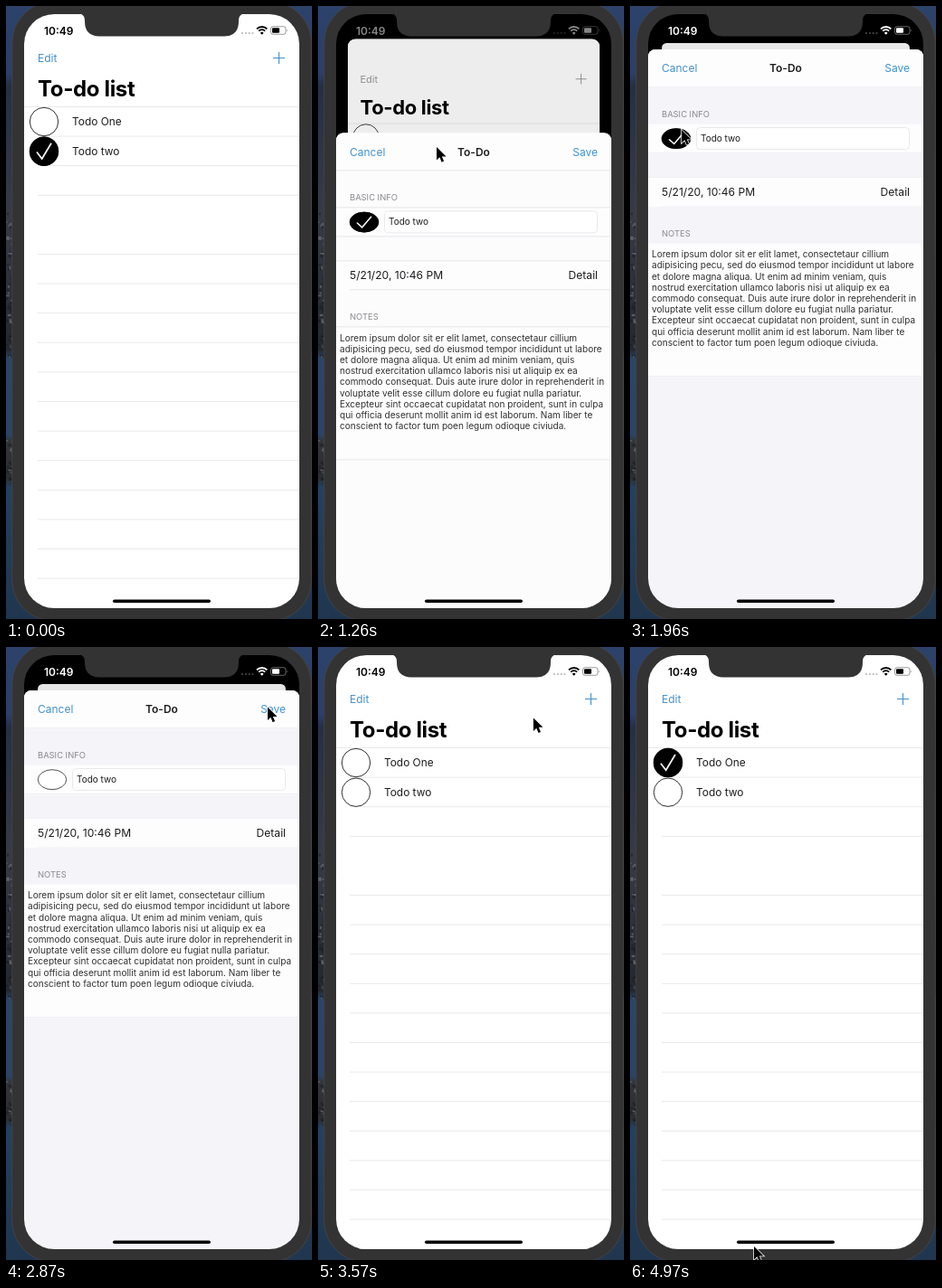
An HTML page for the animation above (5040 ms loop, 338 px wide and 678 px high).

```html
<!DOCTYPE html>
<html lang="en">
<head>
<meta charset="utf-8">
<title>To-do list</title>
<style>
html, body { margin: 0; width: 100%; height: 100%; overflow: hidden; background: #333; }
svg { display: block; width: 338px; height: 678px; font-family: Inter, "Liberation Sans", sans-serif; }
text { white-space: pre; }
</style>
</head>
<body>
<svg id="stage" viewBox="0 0 338 678" xmlns="http://www.w3.org/2000/svg"></svg>
<script>
const LOOP = 5040, BLUE = '#4390cd', INK = '#1c1c1e';
const NOTES = [
  'Lorem ipsum dolor sit er elit lamet, consectetaur cillium',
  'adipisicing pecu, sed do eiusmod tempor incididunt ut labore',
  'et dolore magna aliqua. Ut enim ad minim veniam, quis',
  'nostrud exercitation ullamco laboris nisi ut aliquip ex ea',
  'commodo consequat. Duis aute irure dolor in reprehenderit in',
  'voluptate velit esse cillum dolore eu fugiat nulla pariatur.',
  'Excepteur sint occaecat cupidatat non proident, sunt in culpa',
  'qui officia deserunt mollit anim id est laborum. Nam liber te',
  'conscient to factor tum poen legum odioque civiuda.'
];

// y is the middle of the capitals
const text = (x, y, size, str, attrs = '') =>
  `<text x="${x}" y="${y + size * 0.364}" font-size="${size}" fill="${INK}" ${attrs}>${str}</text>`;
const rect = (x, y, w, h, fill, attrs = '') =>
  `<rect x="${x}" y="${y}" width="${w}" height="${h}" fill="${fill}" ${attrs}/>`;
const rule = (x, y, color, attrs = '') => rect(x, y, 324 - x, 1, color, attrs);
const checkbox = (id, x, y, scaleY = 1) =>
  `<g transform="translate(${x} ${y}) scale(1 ${scaleY})">
    <circle r="15.7" fill="#fff" stroke="#333"/>
    <g id="${id}"><circle r="16.2"/>
      <path d="M-8 .8L-2.3 8.2 8-9" fill="none" stroke="#fff" stroke-width="1.7"/></g>
  </g>`;

const listLines = Array.from({ length: 17 }, (_, i) =>
  rule(i ? 35 : 20, 111 + 32.6 * i, '#e9e9eb', i === 4 ? 'id="midLine"' : '')).join('');

const list = `<g id="list" clip-path="url(#cardClip)">
  ${rect(20, 9, 304, 657, '#fff')}${listLines}
  <g id="tint">${text(35, 57.5, 12, 'Edit', 'style="fill:inherit"')}
    <path d="M295 57.5h13M301.5 51v13" stroke-width="1.1"/></g>
  ${text(35, 91.6, 24, 'To-do list', 'font-weight="700" letter-spacing="-.35" style="fill:#000"')}
  ${checkbox('markOne', 42, 128)}${checkbox('markTwo', 42, 160.7)}
  ${text(73, 128, 11.9, 'Todo One', 'id="labelOne"')}${text(73, 160.5, 11.9, 'Todo two')}
  <rect id="dim" x="20" y="9" width="304" height="657"/>
</g>`;

const sheet = `<g id="sheet">
  ${rect(20, 48, 304, 700, '#f4f4f9', 'rx="8"')}
  ${rect(20, 48, 304, 700, '#fff', 'rx="8" id="veil"')}
  ${rect(20, 48, 304, 41, '#fdfdfe', 'rx="8"')}${rect(20, 60, 304, 29, '#fdfdfe')}
  ${[[130, 32], [190, 32], [262, 147]].map(([y, h]) => rect(20, y, 304, h, '#fdfdfe')).join('')}
  <g id="rules">${[89, 130, 162, 189, 221, 262, 409].map(y => rule(y === 221 ? 35 : 20, y, '#e6e6ea')).join('')}</g>
  ${text(35, 69, 12, 'Cancel', `style="fill:${BLUE}"`)}
  ${text(172, 69, 12, 'To-Do', 'font-weight="600" text-anchor="middle"')}
  ${text(309, 69, 12, 'Save', `id="save" text-anchor="end" style="fill:${BLUE}"`)}
  ${text(35, 119.3, 9.4, 'BASIC INFO', 'style="fill:#8a8a8e"')}
  ${checkbox('markSheet', 51, 146.7, 0.7)}
  ${rect(73.5, 134.5, 235, 24, '#fff', 'rx="4" stroke="#e9e9eb"')}
  ${text(78, 146.3, 10, 'Todo two')}
  ${text(35, 205.3, 12.1, '5/21/20, 10:46 PM')}
  ${text(309, 205.3, 12.1, 'Detail', 'text-anchor="end"')}
  ${text(35, 251.5, 9.4, 'NOTES', 'style="fill:#8a8a8e"')}
  ${NOTES.map((line, i) => text(24, 274.5 + 12.2 * i, 10.07, line, 'style="fill:#303032"')).join('')}
</g>`;

const status = `<g id="status">
  ${text(42, 27.3, 12, '10:49', 'font-weight="600" style="fill:inherit"')}
  ${[261, 265, 268.7, 272.4].map(x => `<circle cx="${x}" cy="30" r="1.1" opacity=".28"/>`).join('')}
  <path d="M277 25.4a8 8 0 0 1 11.4 0M279.2 27.7a5 5 0 0 1 7 0" fill="none" stroke-width="1.8"/>
  <path d="M282.7 31.8l-1.9-2a2.7 2.7 0 0 1 3.8 0z"/>
  <rect x="292.5" y="22.7" width="16.5" height="8.6" rx="2.4" fill="none" opacity=".4"/>
  <rect x="294" y="24.2" width="8" height="5.6" rx="1"/>
  <path d="M310.3 25.5q1.6 1.5 0 3z" opacity=".45"/>
</g>`;

const wallpaper = [[0, '#2c426a'], [0.11, '#2b4067'], [0.13, '#252f45'], [0.34, '#373b47'], [0.56, '#23272f'],
  [0.575, '#2b4567'], [0.7, '#2a4466'], [0.71, '#33353a'], [0.77, '#2b2d32'], [0.785, '#24415f'], [1, '#20364f']];

// Seeded specks for the rocky parts of the wallpaper
let seed = 7;
const random = () => (seed = seed * 16807 % 2147483647) / 2147483647;
const rocks = (from, to, count) => Array.from({ length: count }, () =>
  rect(random() * 7, from + random() * (to - from), 1 + random() * 3, 1 + random() * 3,
    random() < 0.4 ? '#8a8c92' : '#14171d', 'opacity=".5"')).join('');

stage.innerHTML = `<defs>
  <linearGradient id="wall" x2="0" y2="1">${wallpaper.map(([o, c]) => `<stop offset="${o}" stop-color="${c}"/>`).join('')}</linearGradient>
  <clipPath id="screenClip"><rect x="20" y="9" width="304" height="657" rx="33"/></clipPath>
  <clipPath id="cardClip"><rect id="card" x="20" y="9" width="304" height="657"/></clipPath>
</defs>
${rect(0, 0, 338, 678, 'url(#wall)')}${rocks(215, 388, 50)}${rocks(480, 528, 24)}
${rect(6.8, -4.5, 330.4, 684.5, '#333', 'rx="45" stroke="#484747" stroke-width=".8"')}
<g clip-path="url(#screenClip)">
  ${rect(20, 9, 304, 657, '#000')}${list}${sheet}
  <path d="M80 8Q87 9 87 16V17Q87 33.4 103 33.4H241Q257 33.4 257 17V16Q257 9 264 8z" fill="#333"/>
  ${status}
  ${rect(118, 656.5, 108, 3.6, '#000', 'rx="1.8"')}
</g>
<path id="cursor" d="M0 0V15.5l3.6-3.4 2.4 5.6 2.6-1.1-2.4-5.5h5z" stroke="#fff" stroke-width="1.6" paint-order="stroke"/>`;

const $ = id => document.getElementById(id);
const set = (id, attrs) => { for (const k in attrs) $(id).setAttribute(k, attrs[k]); };
const ramp = (t, from, to) => Math.min(1, Math.max(0, (t - from) / (to - from)));
const ease = u => u * u * (3 - 2 * u);
// Critically damped spring from 0 to 1
const spring = ms => { const x = Math.max(0, ms) * 0.0168; return 1 - (1 + x) * Math.exp(-x); };

// time, x, y of the pointer tip
const PATH = [[70, 137, 650], [630, 135, 156], [1050, 135, 156], [1260, 131, 156], [1580, 131, 156], [1950, 57, 137],
  [2280, 57, 137], [2830, 289, 66.5], [3420, 289, 66.5], [3930, 47, 123], [4650, 47, 123], [4970, 137, 663]];

function pointer(t) {
  const i = PATH.findIndex(p => p[0] > t);
  if (i < 1) return (i ? PATH[PATH.length - 1] : PATH[0]).slice(1);
  const [a, b] = [PATH[i - 1], PATH[i]], u = ease(ramp(t, a[0], b[0]));
  return [1, 2].map(k => a[k] + (b[k] - a[k]) * u);
}

function draw(t) {
  const shown = spring(t - 1060) - spring(t - 3025);
  const scale = 1 - 0.099 * shown;
  set('list', { transform: `translate(172 ${9 + 32 * shown}) scale(${scale}) translate(-172 -9)` });
  set('card', { rx: shown > 0.003 ? 30 - 24 * shown : 0 });
  set('dim', { opacity: 0.095 * shown * shown });
  set('midLine', { opacity: +(shown > 0.01) });
  const tint = t > 1060 && t < 3025 ? '#98989c' : BLUE;
  set('tint', { fill: tint, stroke: 'none' });
  $('tint').lastElementChild.setAttribute('stroke', tint);
  set('sheet', { transform: `translate(0 ${618 * (1 - shown)})` });

  const settled = ramp(t, 1300, 1500);
  set('veil', { opacity: 0.75 * (1 - settled) });
  set('rules', { opacity: 1 - 0.75 * settled });
  set('save', { opacity: t > 2960 ? 0.75 : 1 });

  const pressed = ramp(t, 4200, 4460);
  set('markOne', { opacity: pressed });
  set('labelOne', { opacity: t < 4200 ? 1 : 0.6 + 0.4 * pressed });
  set('markTwo', { opacity: +(t < 2950) });
  set('markSheet', { opacity: 1 - ramp(t, 1990, 2100) });

  const level = Math.round(255 * (ramp(t, 1060, 1440) - ramp(t, 3025, 3520)));
  const gray = `rgb(${level},${level},${level})`;
  set('status', { fill: gray, stroke: 'none' });
  $('status').querySelectorAll('[fill=none]').forEach(e => e.setAttribute('stroke', gray));

  set('cursor', { transform: `translate(${pointer(t)}) scale(.94)`, visibility: t < 70 ? 'hidden' : 'visible' });
}

const start = performance.now();
function frame() {
  draw((performance.now() - start) % LOOP);
  requestAnimationFrame(frame);
}
frame();
</script>
</body>
</html>
```
